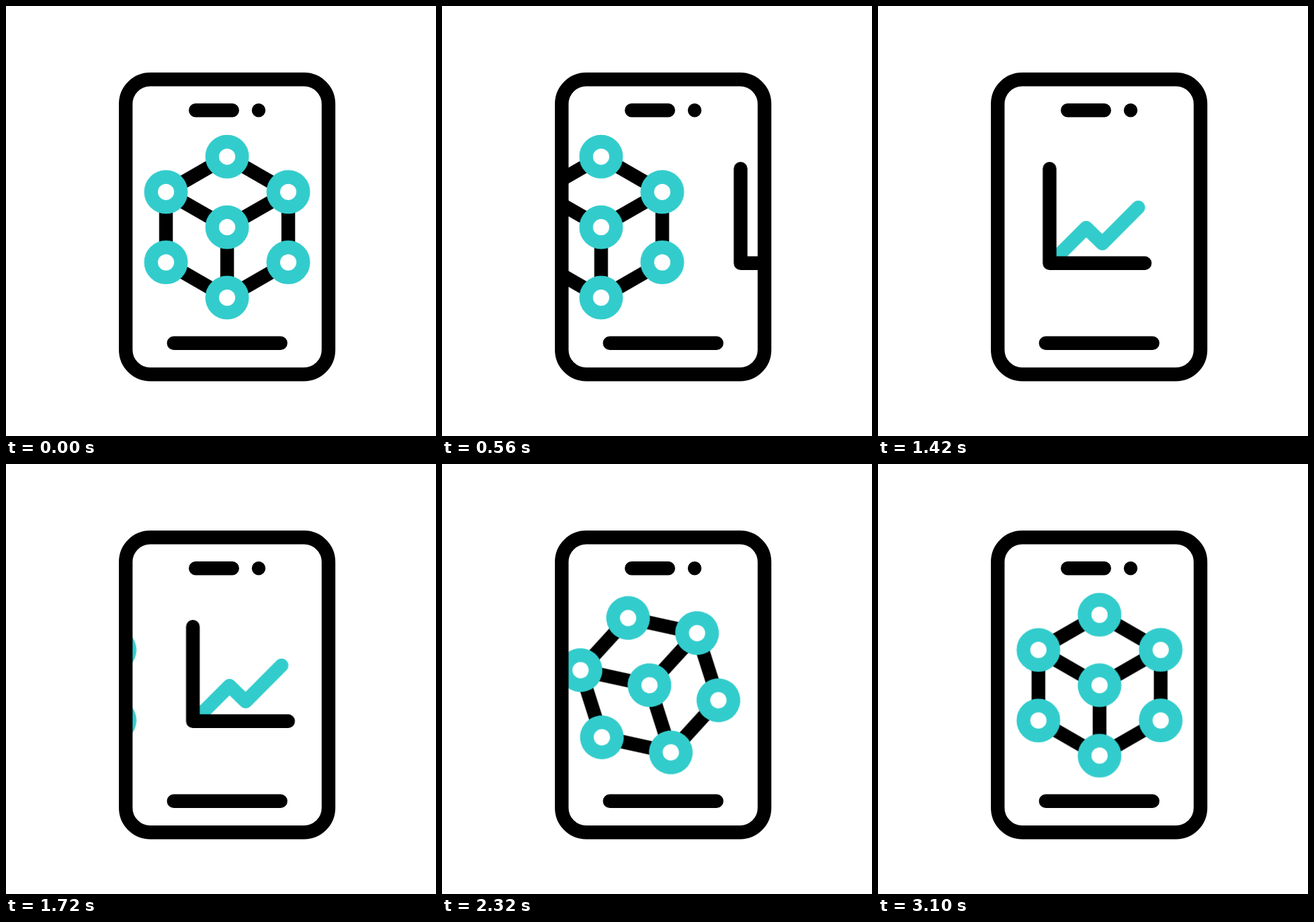
An HTML page without scripts for the animation above (3.42 s loop, 640x640 px).

```html
<!DOCTYPE html>
<html lang="en">
<head>
<meta charset="utf-8">
<title>Phone with sliding cube and chart</title>
<style>
  html, body { margin: 0; width: 100%; height: 100%; overflow: hidden; background: #fff; }
  svg { display: block; width: 100vw; height: 100vh; }

  .ink, .trend { fill: none; stroke: #000; stroke-width: 20.4; stroke-linecap: round; stroke-linejoin: round; }
  .trend { stroke: #3cc; stroke-dasharray: 100 101; }
  .node { fill: #fff; stroke: #3cc; stroke-width: 20.4; }

  .strip, .roll, .trend, .hop { animation: 3.42s linear infinite; }
  .strip { animation-name: slide; }
  .roll { animation-name: roll; }
  .trend { animation-name: draw; }
  .hop { --ease: cubic-bezier(.37, 0, .63, 1); }

  /* wind up, sweep, settle: once to the chart, once to the second cube */
  @keyframes slide {
    0% { transform: translateX(0); animation-timing-function: cubic-bezier(.37, 0, .63, 1); }
    10.526% { transform: translateX(21.5px); animation-timing-function: cubic-bezier(.47, 0, .53, 1); }
    24.561% { transform: translateX(-303px); animation-timing-function: cubic-bezier(.37, 0, .63, 1); }
    35.088% { transform: translateX(-281.5px); }
    40.936% { transform: translateX(-281.5px); animation-timing-function: cubic-bezier(.37, 0, .63, 1); }
    51.462% { transform: translateX(-257.8px); animation-timing-function: cubic-bezier(.47, 0, .53, 1); }
    65.497% { transform: translateX(-618.7px); animation-timing-function: cubic-bezier(.37, 0, .63, 1); }
    76.023%, 100% { transform: translateX(-595px); }
  }
  @keyframes roll {
    0%, 40.936% { transform: rotate(360deg); animation-timing-function: cubic-bezier(.37, 0, .63, 1); }
    51.462% { transform: rotate(380deg); animation-timing-function: cubic-bezier(.47, 0, .53, 1); }
    65.497% { transform: rotate(-20deg); animation-timing-function: cubic-bezier(.37, 0, .63, 1); }
    76.023%, 100% { transform: rotate(0deg); }
  }
  @keyframes draw {
    0% { stroke-dashoffset: 100; }
    22.807% { stroke-dashoffset: 100; animation-timing-function: cubic-bezier(.33, 0, .67, 1); }
    35.088%, 100% { stroke-dashoffset: 0; }
  }

  /* each node hops to the next corner; starts are staggered, arrival is shared */
  @keyframes hop1 {
    0%, 76.901% { transform: none; animation-timing-function: cubic-bezier(.37, 0, .63, 1); }
    90.643%, 100% { transform: translate(var(--x), var(--y)); }
  }
  @keyframes hop2 {
    0%, 77.485% { transform: none; animation-timing-function: cubic-bezier(.37, 0, .63, 1); }
    90.643%, 100% { transform: translate(var(--x), var(--y)); }
  }
  @keyframes hop3 {
    0%, 78.07% { transform: none; animation-timing-function: cubic-bezier(.37, 0, .63, 1); }
    90.643%, 100% { transform: translate(var(--x), var(--y)); }
  }
  @keyframes hop4 {
    0%, 78.655% { transform: none; animation-timing-function: cubic-bezier(.37, 0, .63, 1); }
    90.643%, 100% { transform: translate(var(--x), var(--y)); }
  }
  .top { --x: 91px; --y: 52.4px; animation-name: hop3; }
  .upper-right { --x: 0px; --y: 104.9px; animation-name: hop2; }
  .lower-right { --x: -91px; --y: 52.4px; animation-name: hop1; }
  .bottom { --x: -91px; --y: -52.4px; animation-name: hop2; }
  .lower-left { --x: 0px; --y: -104.9px; animation-name: hop3; }
  .upper-left { --x: 91px; --y: -52.4px; animation-name: hop4; }
</style>
</head>
<body>
<svg viewBox="0 0 640 640">
  <defs>
    <clipPath id="screen"><rect x="178" y="109" width="302" height="439"/></clipPath>
    <circle id="node" class="node" r="22.3"/>
    <path id="edges" class="ink" d="M0-104.9 91-52.4V52.4L0 104.9-91 52.4V-52.4ZM-91-52.4 0 0 91-52.4M0 0V104.9"/>
  </defs>

  <g clip-path="url(#screen)">
    <g class="strip">
      <g transform="translate(329 329.2)">
        <use href="#edges"/>
        <use href="#node"/>
        <use href="#node" y="-104.9"/>
        <use href="#node" x="91" y="-52.4"/>
        <use href="#node" x="91" y="52.4"/>
        <use href="#node" y="104.9"/>
        <use href="#node" x="-91" y="52.4"/>
        <use href="#node" x="-91" y="-52.4"/>
      </g>

      <g transform="translate(536.6 0)">
        <path class="trend" pathLength="100" d="M2 382.5 54.5 330 78.5 353.5 132 299.8"/>
        <path class="ink" d="M0 242.2V382.7H141.7"/>
      </g>

      <g transform="translate(924.7 329.2)">
        <g class="roll">
          <use href="#edges"/>
          <use href="#node"/>
          <g class="hop top"><use href="#node" y="-104.9"/></g>
          <g class="hop upper-right"><use href="#node" x="91" y="-52.4"/></g>
          <g class="hop lower-right"><use href="#node" x="91" y="52.4"/></g>
          <g class="hop bottom"><use href="#node" y="104.9"/></g>
          <g class="hop lower-left"><use href="#node" x="-91" y="52.4"/></g>
          <g class="hop upper-left"><use href="#node" x="-91" y="-52.4"/></g>
        </g>
      </g>
    </g>
  </g>

  <rect class="ink" x="178.2" y="109.3" width="301.8" height="438.9" rx="36.5"/>
  <path class="ink" d="M282.2 155.2H336.8M376 155.2h.01M249.7 501.7H408.7"/>
</svg>
</body>
</html>
```
